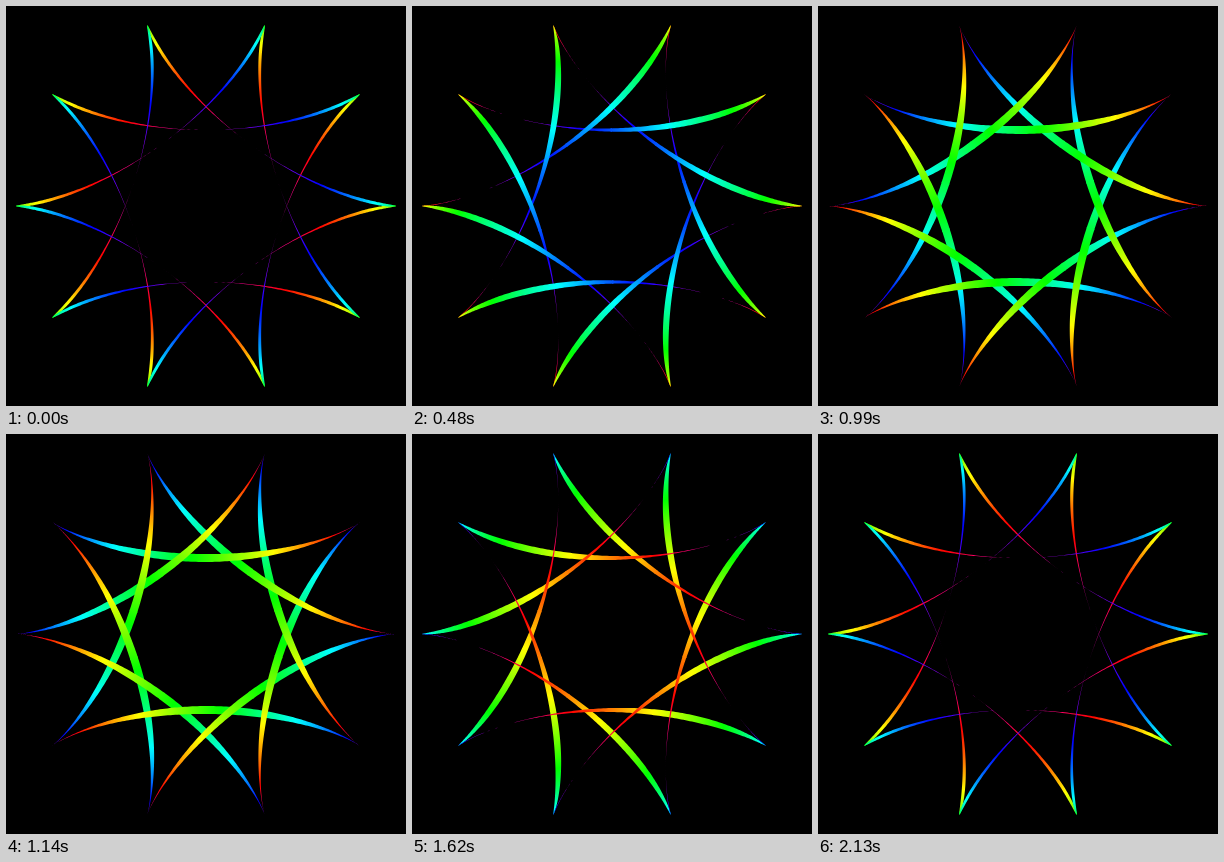
An HTML page with a canvas for the animation above (2.16 s loop, 400x400 px).

```html
<!DOCTYPE html>
<html lang="en">
<head>
<meta charset="utf-8">
<title>Hypocycloid ribbons</title>
<style>
  html, body { margin: 0; width: 100%; height: 100%; overflow: hidden; background: #000; }
  canvas { display: block; width: 400px; height: 400px; }
</style>
</head>
<body>
<canvas id="stage" width="400" height="400"></canvas>
<script>
const ctx = document.getElementById('stage').getContext('2d');
const LOOP = 2160, STEP = 30;
const ARCS = 10, BIG = 133, SMALL = 57, RATIO = 7 / 3;
const HALF_ANGLE = Math.PI * 0.3;
const MAX_WIDTH = 8, SAMPLES = 100;

// Point on the top arc, s running from the right cusp (0) to the left one (1).
function arcPoint(s) {
  const a = HALF_ANGLE * (1 - 2 * s);
  return {
    x: BIG * Math.sin(a) + SMALL * Math.sin(RATIO * a),
    y: SMALL * Math.cos(RATIO * a) - BIG * Math.cos(a),
    nx: Math.sin(a * 2 / 3),
    ny: Math.cos(a * 2 / 3)
  };
}

const END = arcPoint(0).x;

function ribbonWidth(s, phase) {
  return MAX_WIDTH * Math.sin(Math.PI * s) * Math.cos(Math.PI * (s - phase)) ** 2;
}

function ribbon(from, to, phase) {
  const path = new Path2D();
  const back = [];
  for (let i = 0; i <= SAMPLES; i++) {
    const s = from + (to - from) * i / SAMPLES;
    const p = arcPoint(s);
    const h = ribbonWidth(s, phase) / 2;
    path.lineTo(p.x + p.nx * h, p.y + p.ny * h);
    back.push([p.x - p.nx * h, p.y - p.ny * h]);
  }
  for (const [x, y] of back.reverse()) path.lineTo(x, y);
  path.closePath();
  return path;
}

function rainbow(phase) {
  const g = ctx.createLinearGradient(END, 0, -END, 0);
  for (let i = 0; i <= SAMPLES; i++) {
    const s = i / SAMPLES;
    const hue = (120 + 360 * (s - phase) + 720) % 360;
    const at = (END - arcPoint(s).x) / (2 * END);
    g.addColorStop(Math.min(1, Math.max(0, at)), `hsl(${hue}, 100%, 50%)`);
  }
  return g;
}

function draw(phase) {
  ctx.setTransform(1, 0, 0, 1, 0, 0);
  ctx.fillStyle = '#000';
  ctx.fillRect(0, 0, 400, 400);
  ctx.fillStyle = rainbow(phase);
  // Far halves first, so each arc's near half lies on top at crossings.
  for (const half of [ribbon(0.5, 1, phase), ribbon(0, 0.503, phase)]) {
    for (let k = 0; k < ARCS; k++) {
      ctx.setTransform(1, 0, 0, 1, 200, 200);
      ctx.rotate(k * 2 * Math.PI / ARCS);
      ctx.fill(half);
    }
  }
}

const start = performance.now();
function tick() {
  const t = (performance.now() - start) % LOOP;
  draw(Math.floor(t / STEP) * STEP / LOOP);
  requestAnimationFrame(tick);
}
tick();
</script>
</body>
</html>
```
